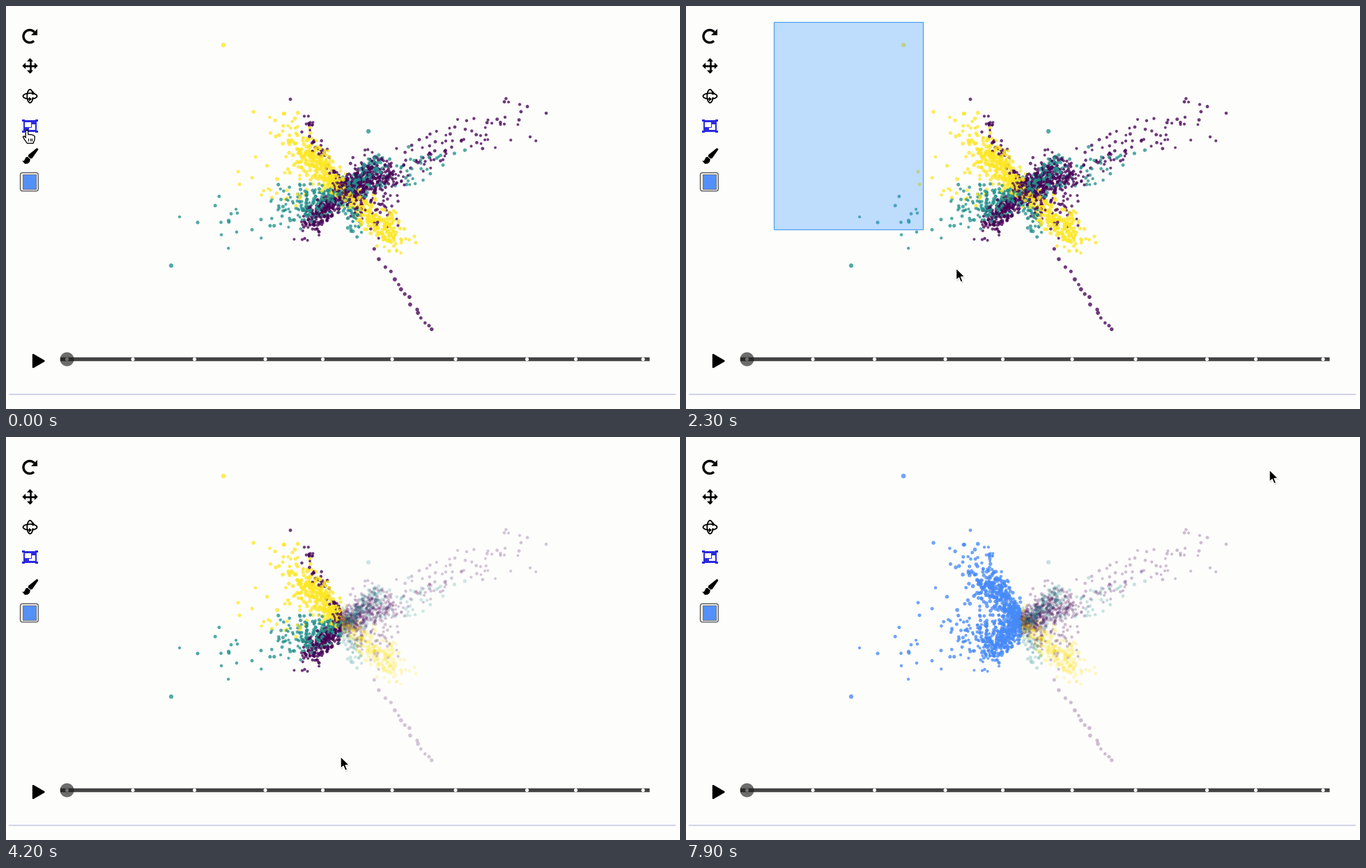
These frames come from a looping animation (967x579 px, 8 s). A matplotlib script:

```python
import numpy as np
import matplotlib.pyplot as plt
from matplotlib.animation import FuncAnimation
from matplotlib.colors import to_rgb
from matplotlib.patches import Arc, Circle, FancyBboxPatch, Polygon, Rectangle
from matplotlib.transforms import Affine2D

W, H, DPI = 967, 579, 64
PX = 72 / DPI  # points per pixel
FRAMES, STEP = 80, 100
BG, BLUE, ACTIVE = "#fdfdfc", "#5390fa", "#2a2adf"
PURPLE, TEAL, YELLOW = "#440154", "#21918c", "#fde725"
CUT_X = 480
DRAG, DROP, PAINT = 1.7, 3.8, 5.9

fig = plt.figure(figsize=(W / DPI, H / DPI), dpi=DPI, facecolor=BG)
ax = fig.add_axes([0, 0, 1, 1])
ax.set_xlim(0, W)
ax.set_ylim(H, 0)
ax.axis("off")


def poly(pts, fc="k", ec="none", lw=0.0, z=5, **kw):
    return ax.add_patch(Polygon(pts, closed=True, fc=fc, ec=ec, lw=lw * PX,
                                joinstyle="round", zorder=z, **kw))


def box(x0, y0, x1, y1, fc="k", ec="none", lw=0.0, z=5):
    return ax.add_patch(Rectangle((x0, y0), x1 - x0, y1 - y0, fc=fc, ec=ec,
                                  lw=lw * PX, zorder=z))


def line(xs, ys, color="k", lw=1.0, z=5, **kw):
    return ax.plot(xs, ys, color=color, lw=lw * PX, zorder=z,
                   solid_capstyle="butt", **kw)[0]


def dot(x, y, r, color, z=5, **kw):
    ax.add_patch(Circle((x, y), r, fc=color, ec="none", zorder=z, **kw))


def arc(x, y, w, h, start, end, lw):
    ax.add_patch(Arc((x, y), w, h, theta1=start, theta2=end, fill=False,
                     ec="k", lw=lw * PX, zorder=5))


# ---- scatter: spokes of points running out from one hub --------------------
rng = np.random.default_rng(12)
HUB = np.array([485, 268])
RADIUS = {PURPLE: 2.2, TEAL: 2.35, YELLOW: 2.6}

# colour, count, tip, crowding towards the hub, spread
SPOKES = [
    (PURPLE, 330, (540, 235), 1.1, 13),
    (PURPLE, 240, (428, 318), 1.1, 9),
    (PURPLE, 170, (740, 150), 2.0, 15),
    (PURPLE, 70, (425, 160), 1.4, 5),
    (PURPLE, 90, (545, 300), 1.0, 14),
    (TEAL, 120, (535, 225), 1.0, 7),
    (TEAL, 80, (650, 205), 1.5, 15),
    (TEAL, 200, (400, 295), 1.1, 14),
    (TEAL, 20, (300, 325), 1.0, 18),
    (TEAL, 45, (503, 325), 0.8, 6),
    (YELLOW, 270, (428, 208), 0.9, 11),
    (YELLOW, 75, (387, 160), 0.9, 13),
    (YELLOW, 50, (370, 250), 1.0, 20),
    (YELLOW, 250, (560, 332), 0.8, 11),
]
LONERS = {
    PURPLE: [(408, 134), (721, 138), (775, 154), (752, 188)],
    TEAL: [(249, 303), (275, 311), (319, 348)],
    YELLOW: [(355, 152), (333, 238), (588, 340)],
}
BIG = {YELLOW: [(312, 56)], TEAL: [(237, 373), (520, 180)]}


def spoke(n, tip, crowd, spread):
    u = rng.random((n, 1)) ** crowd
    noise = np.clip(rng.normal(size=(n, 2)), -2.2, 2.2)
    return HUB + u * (np.array(tip) - HUB) + noise * spread * (0.6 + 0.6 * u)


def make_points():
    groups = [(c, spoke(*rest), RADIUS[c]) for c, *rest in SPOKES]
    groups += [(c, np.array(p), RADIUS[c]) for c, p in LONERS.items()]
    groups += [(c, np.array(p), 3.5) for c, p in BIG.items()]
    # sparse trail to the lower right
    u = np.linspace(0, 1, 16)[:, None] ** 0.8
    trail = (529, 352) + u * (81, 113) + rng.normal(0, 2, (16, 2))
    groups.append((PURPLE, trail, 2.7))

    xy = np.concatenate([p for _, p, _ in groups])
    rgb = np.concatenate([np.tile(to_rgb(c), (len(p), 1)) for c, p, _ in groups])
    rad = np.concatenate([np.full(len(p), r) for _, p, r in groups])
    rad = rad * rng.uniform(0.85, 1.12, len(rad))
    order = rng.permutation(len(rad))
    return xy[order], rad[order], rgb[order]


xy, rad, rgb = make_points()
chosen = xy[:, 0] < CUT_X


def shades(selected=False, painted=False):
    out = np.column_stack([rgb, np.full(len(rgb), 0.77)])
    if selected:
        out[~chosen, 3] = 0.25 if painted else 0.22
    if painted:
        out[chosen, :3] = to_rgb("#468af8")
    return out


LOOKS = [shades(), shades(True), shades(True, True)]
points = ax.scatter(xy[:, 0], xy[:, 1], s=(2 * rad * PX) ** 2, lw=0,
                    c=LOOKS[0], zorder=2)

# ---- toolbar ---------------------------------------------------------------
# redo
arc(34, 43.5, 18, 18, 48, 318, 3.4)
poly([(45, 33), (45, 42.3), (35.8, 42.3)])

# move
line([26, 43], [86, 86], lw=2.6)
line([34.5, 34.5], [77, 95], lw=2.6)
head = np.array([(11.2, 0), (6.4, -4.6), (6.4, 4.6)])
for k in range(4):
    c, s = np.cos(k * np.pi / 2), np.sin(k * np.pi / 2)
    poly(head @ [[c, s], [-s, c]] + (34.5, 86))

# orbit
arc(34.5, 129.5, 20, 8.4, 105, 415, 1.8)
arc(34.5, 129.5, 8.4, 19, 20, 335, 1.8)
poly([(33, 130.5), (33, 137), (37, 133.7)])
poly([(36, 126), (41.5, 126), (38.7, 122)])

# area select
def cell(x0, y0, x1, y1, color):
    s = 22.6 / 512
    box(23.2 + x0 * s, 161.3 + y0 * s, 23.2 + x1 * s, 161.3 + y1 * s, fc=color)


cell(32, 64, 480, 448, ACTIVE)
for cx in (0, 432):
    for cy in (32, 400):
        cell(cx, cy, cx + 80, cy + 80, ACTIVE)
cell(92, 126, 288, 288, BG)
cell(224, 320, 420, 388, BG)
cell(322, 192, 420, 388, BG)

# brush
brush = [
    poly([(44.5, 204.5), (46, 206), (37.5, 218.2), (35.5, 219), (32, 216),
          (32.5, 214)], ec="k", lw=0.8),
    poly([(31, 216.8), (34.8, 220.3), (34, 224), (31, 226.5), (27, 226.8),
          (23.2, 222.3), (25.8, 222.6), (28.6, 217.2)]),
]

# colour swatch
ax.add_patch(FancyBboxPatch((23.2, 242.2), 20.4, 21,
                            boxstyle="round,pad=2.7,rounding_size=3.2",
                            fc="#efefeb", ec="#555555", lw=1.3 * PX, zorder=5))
box(23.8, 242.4, 43, 263, fc=BLUE, ec="#70778a", lw=1)

# ---- timeline --------------------------------------------------------------
poly([(39, 501), (54.5, 510), (39, 519)], ec="k", lw=2.4)
line([78, 923.5], [507.5, 507.5], color="#434343", lw=5.5, snap=False)
for x in (87.5, 182, 270.5, 372, 454.5, 554, 645, 747.5, 817.5, 914):
    dot(x, 507.5, 2.6, "white", z=6)
dot(87.5, 507.5, 10, "#1c1c1c", z=7, alpha=0.64)
line([4, 961], [558, 558], color="#c9cae4", lw=1.6)

# ---- selection box and cursors ---------------------------------------------
CORNER = (126, 22.5)
area = box(*CORNER, 127, 24, fc=(0.23, 0.6, 0.99, 0.32), ec="#4a9ff0",
           lw=1.2, z=8)

shift = Affine2D()
follow = dict(transform=shift + ax.transData)
ARROW = np.array([(0, 0), (0, 17.4), (4, 13.8), (6.7, 20.2), (9.8, 18.9),
                  (7.1, 12.6), (12.6, 12.4)])
arrow = [poly(ARROW + (1, 1.6), fc=(0, 0, 0, 0.16), z=9, **follow),
         poly(ARROW, ec="white", lw=1.4, z=10, **follow)]

HAND = [(-1.7, 1.6), (0, 0), (1.7, 1.6), (1.8, 6.6), (6.6, 6.8), (10, 8),
        (11.3, 9.8), (11, 14), (9, 19.3), (0.4, 19.3), (-4, 13), (-5.7, 10),
        (-4, 8.8), (-1.7, 11.2)]
hand = [poly(HAND, fc="white", ec="k", lw=1.3, z=10, **follow)]
hand += [line([x, x], [12, 16.2], lw=1.1, z=11, **follow) for x in (2, 4.7, 7.4)]

START = (30, 178)
# begin, end, destination
MOVES = [
    (0.6, 1.5, (126, 22)),
    (1.61, 2.63, (473, 457)),
    (3.0, 3.3, (480, 459)),
    (4.4, 5.3, (37, 214)),
    (6.1, 6.8, (439, 185)),
    (6.85, 7.35, (837, 47)),
]
LEAD = 0.05  # vertical motion runs slightly ahead, which bends the path


def ease(u):
    u = np.clip(u, 0, 1)
    return u * u * (3 - 2 * u)


def cursor(t):
    pos = np.array(START, float)
    prev = pos.copy()
    for begin, end, goal in MOVES:
        u = (np.array([t, t + LEAD]) - begin) / (end - begin)
        pos += (np.array(goal) - prev) * ease(u)
        prev = np.array(goal)
    return pos


def draw(i):
    t = i * STEP / 1000
    x, y = cursor(t)
    shift.clear().translate(x, y)
    on_brush = x < 47 and 203 < y < 228
    over = on_brush or (x < 47 and 162 < y < 184)
    for p in hand:
        p.set_visible(over)
    for p in arrow:
        p.set_visible(not over)
    for p in brush:
        p.set_facecolor("#333333" if on_brush else "k")

    # the box trails the pointer by one step
    area.set_visible(DRAG < t < DROP)
    w, h = np.maximum(cursor(t - STEP / 1000) - CORNER, 1)
    area.set_width(w)
    area.set_height(h)

    points.set_facecolors(LOOKS[int(t >= DROP) + int(t >= PAINT)])
    return []


anim = FuncAnimation(fig, draw, frames=FRAMES, interval=STEP, repeat=True,
                     repeat_delay=0, blit=False)
plt.show()
```
